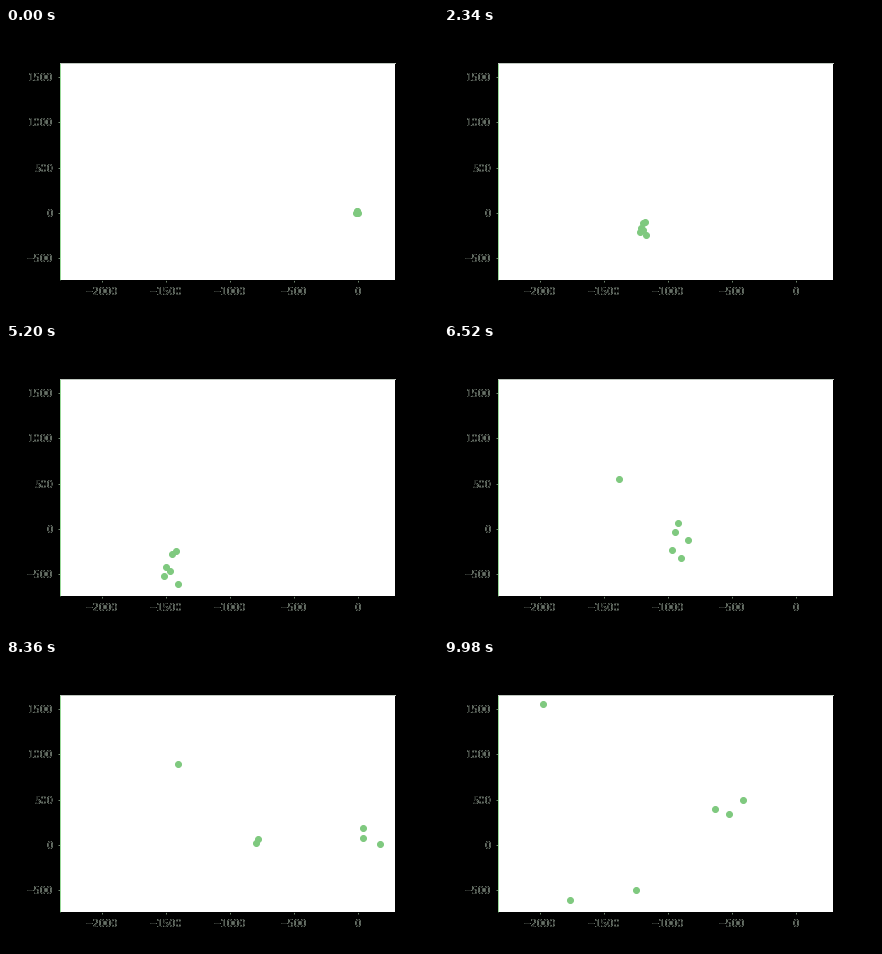
Write a matplotlib script that moves like this. It is 432 px wide and 288 px high and loops after 10 s.

```python
import numpy as np
import matplotlib.pyplot as plt
from matplotlib.animation import FuncAnimation

W, H, DPI = 432, 288, 72
FRAMES, STEP = 500, 20
ORIGIN = np.array([351.5, 184.8])    # stage position of the data origin
SCALE = np.array([0.1277, -0.0904])  # pixels per data unit
LEFT, RIGHT, TOP, BOTTOM = 54, 388.8, 34.56, 252

# Turning points of the flock: time in ms, x, y on the stage
LEAD = [(0, 351, 184), (1030, 316, 207), (1600, 266, 184), (2340, 199, 200),
        (3070, 148, 231), (3660, 88, 223), (3860, 75, 222), (5200, 165, 223)]
SPLIT = LEAD[-1][0]
STOPS = [SPLIT, 6520, 8360, 9980]

# Each member: place within the flock, then its stops after the split
MEMBERS = [
    [(5, -16), (175, 135), (172, 104), (99, 44)],
    [(1, -13), (234, 179), (357, 168), (299, 140)],
    [(-5, 0), (231, 188), (357, 178), (285, 154)],
    [(-1, 4), (244, 196), (374, 184), (271, 149)],
    [(-7, 9), (228, 206), (250, 183), (192, 230)],
    [(7, 17), (237, 214), (252, 179), (126, 240)],
]


def smooth(t, knots, values):
    """Monotone cubic interpolation through the knots."""
    knots, values = np.asarray(knots, float), np.asarray(values, float)
    gap = np.diff(knots)
    slope = np.diff(values) / gap
    a, b = slope[:-1], slope[1:]
    same = a * b > 0
    inner = np.where(same, 2 * a * b / np.where(same, a + b, 1), 0)
    tangent = np.concatenate([slope[:1], inner, slope[-1:]])
    i = np.clip(np.searchsorted(knots, t, side="right") - 1, 0, len(gap) - 1)
    u = (t - knots[i]) / gap[i]
    ease = u * u * (3 - 2 * u)
    return (values[i] + (values[i + 1] - values[i]) * ease
            + gap[i] * (tangent[i] * u * (1 - u) ** 2
                        - tangent[i + 1] * u * u * (1 - u)))


def follow(t, knots, points):
    return np.column_stack([smooth(t, knots, axis) for axis in zip(*points)])


def track(place, *stops):
    """Stage positions of one member: with the flock, then on its own."""
    t = np.arange(FRAMES) * STEP
    together, apart = t[t < SPLIT], t[t >= SPLIT]
    times, *lead = zip(*LEAD)
    spread = 0.08 + 0.92 * (together / SPLIT) ** 1.3
    flock = follow(together, times, zip(*lead)) + np.outer(spread, place)
    start = np.array(LEAD[-1][1:]) + place
    return np.vstack([flock, follow(apart, STOPS, [start, *stops])])


paths = np.stack([track(*m) for m in MEMBERS], axis=1)
paths = (paths - ORIGIN) / SCALE

fig = plt.figure(figsize=(W / DPI, H / DPI), dpi=DPI, facecolor="black")
ax = fig.add_axes([LEFT / W, 1 - BOTTOM / H,
                   (RIGHT - LEFT) / W, (BOTTOM - TOP) / H])
ax.set_xlim((np.array([LEFT, RIGHT]) - ORIGIN[0]) / SCALE[0])
ax.set_ylim((np.array([BOTTOM, TOP]) - ORIGIN[1]) / SCALE[1])
xticks, yticks = range(-2000, 1, 500), range(-500, 1501, 500)
ax.set_xticks(xticks)
ax.set_yticks(yticks)
ax.tick_params(color="#8aa88a", length=2, labelbottom=False, labelleft=False)
for side, color in (("top", "#c0c8c0"), ("left", "#98d898")):
    ax.spines[side].set(color=color, linestyle=(0, (1, 1)), linewidth=1)


def label(x, y, value, **align):
    """Black text with only its soft edge showing on the black stage."""
    text = str(value).replace("-", "\u2212")
    for color in ["#dcf0dc"] * 3 + ["black"]:
        fig.text(x / W, 1 - y / H, text, color=color, fontsize=10,
                 family="DejaVu Sans", **align)


for v in xticks:
    label(ORIGIN[0] + v * SCALE[0], BOTTOM + 7, v, ha="center", va="top")
for v in yticks:
    label(LEFT - 7, ORIGIN[1] + v * SCALE[1], v,
          ha="right", va="center_baseline")

dots = ax.scatter(paths[0, :, 0], paths[0, :, 1], s=36, color="#7fc97f")


def update(frame):
    dots.set_offsets(paths[frame])
    return dots,


anim = FuncAnimation(fig, update, frames=FRAMES, interval=STEP,
                     repeat=True, repeat_delay=0)
plt.show()
```
